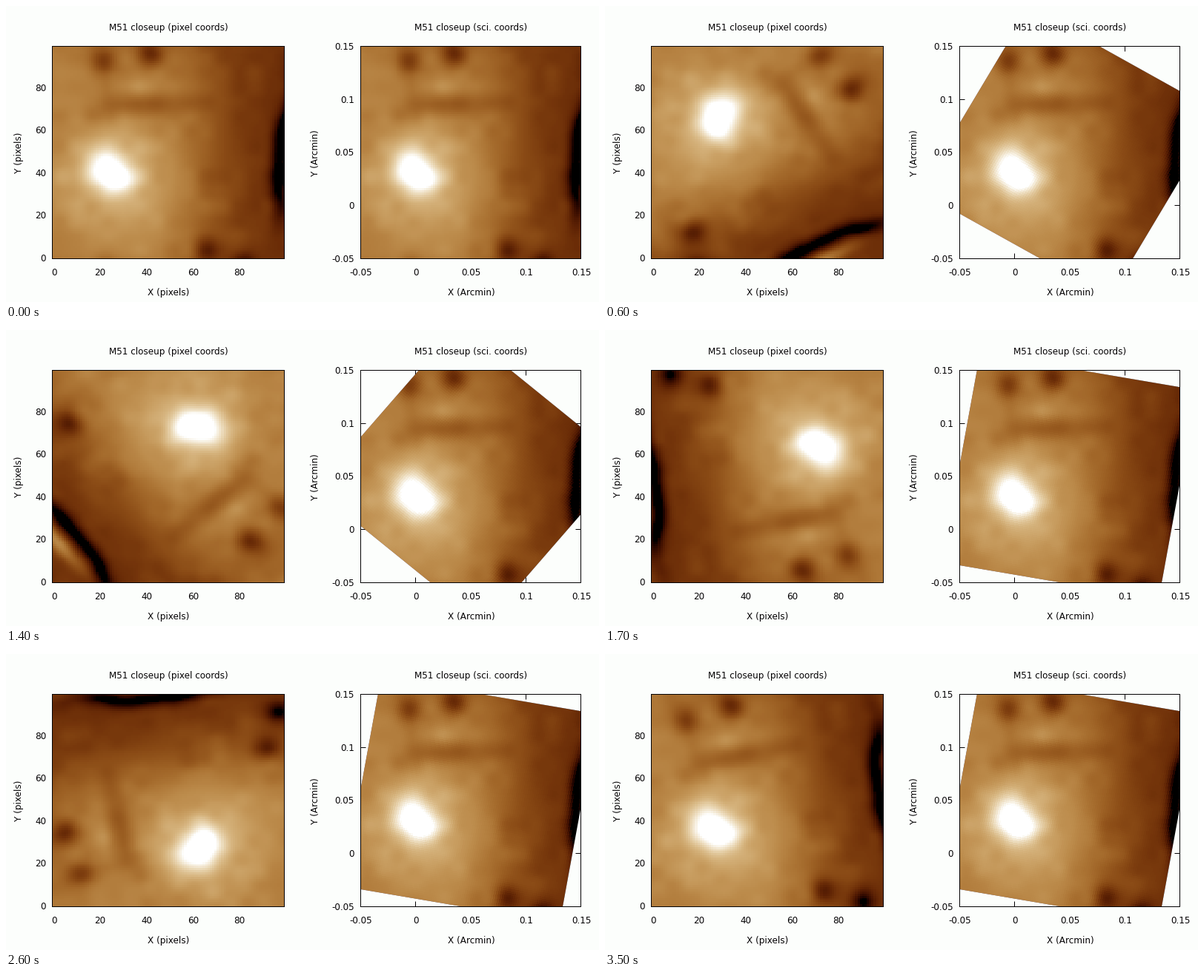
Animation, 800 px wide and 400 px high, one loop 3.6 s. Source, as a matplotlib script:

```python
import numpy as np
import matplotlib.pyplot as plt
from matplotlib.animation import FuncAnimation
from matplotlib.colors import ListedColormap
from matplotlib.transforms import Affine2D

W, H = 800, 400
FRAMES, STEP = 36, 10          # ten degrees per frame
N = 100                        # cells per side of the sampled view
PAPER, INK = "#fcfefc", "#040204"
TOP, BOTTOM = 54, 341

HOLLOWS = [(22, 92), (42, 96), (66, 3), (82, -5), (22, -8)]

# Patchiness on a coarse lattice
CELL, EDGE = 7, -25
patches = np.random.default_rng(5).normal(0, .022, (24, 24))


def ease(a):
    return a * a * (3 - 2 * a)


def sigmoid(a):
    return 1 / (1 + np.exp(-a))


def mottle(x, y):
    u, v = (x - EDGE) / CELL, (y - EDGE) / CELL
    i, j = u.astype(int), v.astype(int)
    a, b = ease(u - i), ease(v - j)
    low = patches[j, i] * (1 - a) + patches[j, i + 1] * a
    high = patches[j + 1, i] * (1 - a) + patches[j + 1, i + 1] * a
    return low * (1 - b) + high * b


def field(x, y):
    def blob(cx, cy, sx, sy):
        return np.exp(-((x - cx) / sx) ** 2 / 2 - ((y - cy) / sy) ** 2 / 2)

    # Bright left side fading to a dark right edge
    z = .19 + .30 * sigmoid((68 - x) / 9) + mottle(x, y)
    # Glowing core
    z += .25 * blob(28, 37, 17, 18)
    z += .36 * blob(22, 43, 6, 6.5) + .30 * blob(29, 36.5, 5, 4.5)
    # Shaded top with a light bar and a band below it
    z += .10 * blob(34, 80, 7, 3) - .15 * blob(36, 71, 14, 4.5)
    z -= .10 * blob(42, 104, 24, 8)
    for cx, cy in HOLLOWS:
        z -= .25 * blob(cx, cy, 4, 5)
    # Black rift near the right edge and the light ridge behind it
    rift = 97.5 + 6 * sigmoid((y - 66) / 4)
    z -= .25 * np.exp(-((x - rift) / 3) ** 2 / 2 - ((y - 48) / 33) ** 4)
    z += .34 * blob(106, 38, 2.5, 14)
    return np.clip(z, 0, 1)


mid = (N - 1) / 2
gx, gy = np.meshgrid(np.arange(N) - mid, np.arange(N) - mid)


def view(angle):
    c, s = np.cos(np.radians(angle)), np.sin(np.radians(angle))
    return field(c * gx - s * gy + mid, s * gx + c * gy + mid)


t = np.linspace(0, 1, 256)
sepia = ListedColormap(np.c_[np.sqrt(t), t, t ** 2])

plt.rcParams["font.family"] = "DejaVu Sans"
fig = plt.figure(figsize=(8, 4), dpi=100, facecolor=PAPER)
PT = 72 / fig.dpi


def label(x, y, s, ha="center", va="baseline", rotation=0):
    fig.text(x / W, 1 - y / H, s, ha=ha, va=va, rotation=rotation,
             fontsize=12 * PT, color=INK)


def panel(left, right, lo, hi, ticks, title, unit, y_label_x):
    ax = fig.add_axes([left / W, 1 - BOTTOM / H,
                       (right - left) / W, (BOTTOM - TOP) / H])
    ax.set_facecolor(PAPER)
    ax.set_axisbelow(True)
    ax.set_xticks(ticks)
    ax.set_yticks(ticks)
    ax.tick_params(direction="in", top=True, right=True, length=7 * PT,
                   width=PT, color=INK, labelbottom=False, labelleft=False)
    for spine in ax.spines.values():
        spine.set(linewidth=PT, color=INK)
    image = ax.imshow(view(0), cmap=sepia, vmin=0, vmax=1, origin="lower",
                      extent=(lo, hi, lo, hi), aspect="auto",
                      interpolation="nearest", zorder=1)
    ax.set(xlim=(lo, hi), ylim=(lo, hi))

    for v in ticks:
        part = (v - lo) / (hi - lo)
        label(left + part * (right - left) + 1, 364.5, f"{v:g}")
        label(left - 8, BOTTOM - part * (BOTTOM - TOP) + 5, f"{v:g}", ha="right")
    centre = (left + right) / 2 + 1
    label(centre, 32.5, title)
    label(centre, 391.5, f"X ({unit})")
    label(y_label_x, 198.5, f"Y ({unit})", va="center", rotation=90)
    return ax, image


_, pixels = panel(62, 375, -.5, N - .5, [0, 20, 40, 60, 80],
                  "M51 closeup (pixel coords)", "pixels", 17)
sky_ax, sky = panel(478, 775, -.05, .15, [-.05, 0, .05, .1, .15],
                    "M51 closeup (sci. coords)", "Arcmin", 417)


def draw(k):
    angle = STEP * k
    z = view(angle)
    pixels.set_data(z)
    sky.set_data(z)
    turn = Affine2D().rotate_deg_around(.05, .05, angle)
    sky.set_transform(turn + sky_ax.transData)
    return pixels, sky


anim = FuncAnimation(fig, draw, frames=FRAMES, interval=100,
                     repeat=True, repeat_delay=0, blit=False)
plt.show()
```
